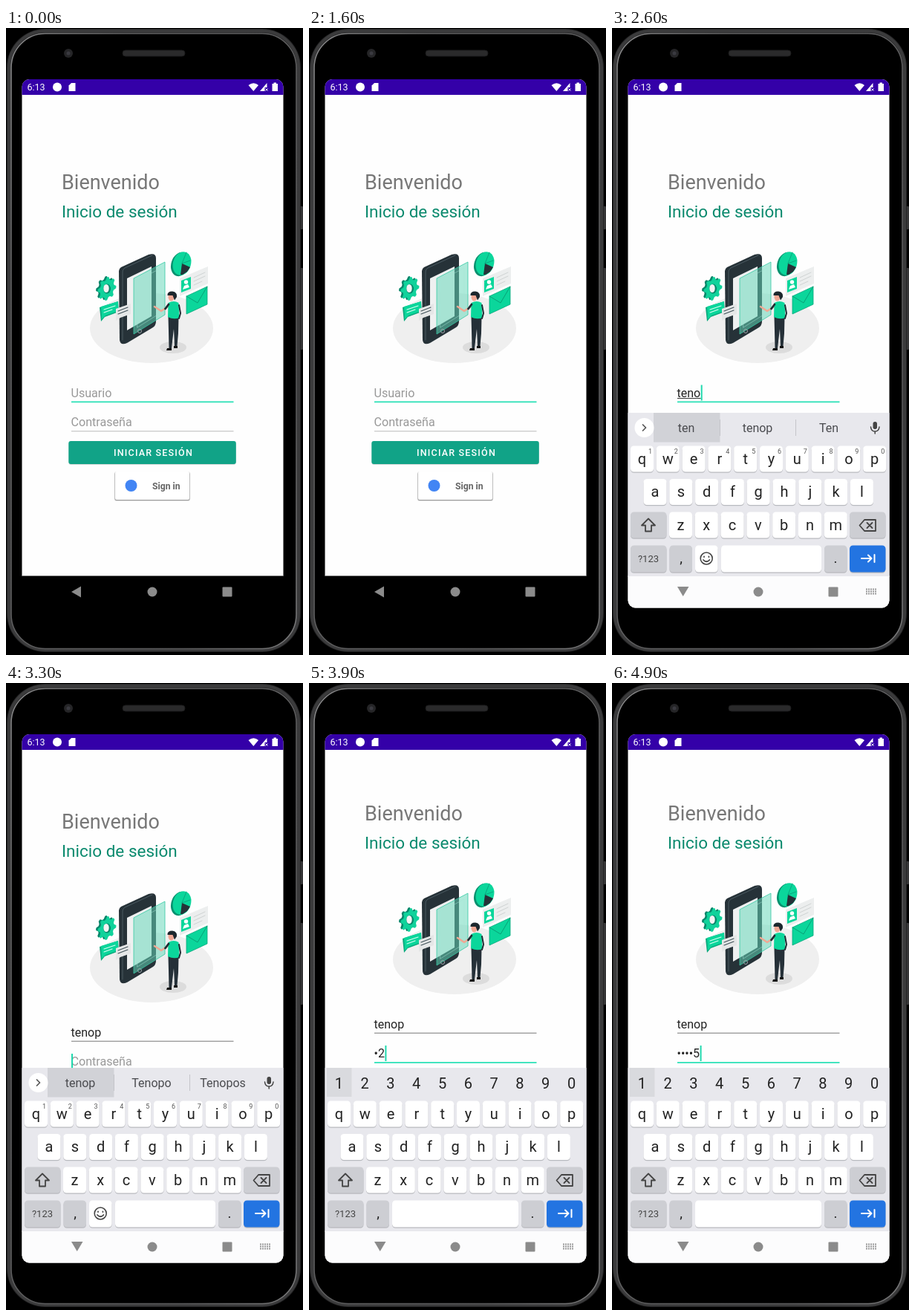
An HTML page that plays this animation: 400x844 px, repeating every 5000 ms.

```html
<!DOCTYPE html>
<html lang="es">
<head>
<meta charset="utf-8">
<title>Inicio de sesión</title>
<style>
html, body { margin: 0; width: 100%; height: 100%; overflow: hidden; background: #000; }
svg { display: block; width: 100%; height: 100%; }
text { font-family: Roboto, Arial, sans-serif; white-space: pre; }
.mid { text-anchor: middle; }
.line { fill: none; stroke-linecap: round; stroke-linejoin: round; }
</style>
</head>
<body>
<svg viewBox="0 0 400 844">
  <defs>
    <linearGradient id="shine" x1="0" x2="1" y1="0" y2="1">
      <stop offset="0" stop-color="#8a8a8b"/><stop offset=".2" stop-color="#626263"/>
      <stop offset=".8" stop-color="#5a5a5b"/><stop offset="1" stop-color="#7a7a7b"/>
    </linearGradient>
    <clipPath id="screen"><rect x="21.500" y="69" width="352" height="711.500" rx="10"/></clipPath>
    <clipPath id="view"><rect x="21" y="90" width="353" height="691"/></clipPath>
  </defs>

  <rect width="400" height="844"/>
  <g fill="#363637">
    <rect x="396" y="240" width="4" height="31" rx="1"/>
    <rect x="396" y="323" width="4" height="110" rx="1"/>
  </g>
  <rect x="1" y="1" width="396" height="839" rx="52" fill="#252526"/>
  <rect x="4" y="4" width="390" height="833" rx="49" fill="none" stroke="#3b3b3c" stroke-width="4"/>
  <rect x="7" y="7.500" width="384" height="828" rx="46" stroke="url(#shine)" stroke-width="1.600"/>
  <circle cx="84" cy="34" r="6" fill="#252527"/><circle cx="84" cy="34" r="2.500" fill="#3a3a40"/>
  <rect x="157" y="30" width="84" height="8" rx="4" fill="#2a2a2b" stroke="#1d1d1e"/>

  <g clip-path="url(#screen)">
    <rect x="21" y="69" width="353" height="669" fill="#fefefe"/>
    <rect id="navBg" x="21" y="737" width="353" height="44" fill="#fefefe"/>
    <g clip-path="url(#view)"><g id="page">
      <text x="75" y="217" font-size="27" fill="#777">Bienvenido</text>
      <text x="75" y="255" font-size="22.500" fill="#0b8a6e">Inicio de sesión</text>
      <g id="art"></g>
      <text id="userHint" x="87.500" y="497" font-size="16.100" fill="#999">Usuario</text>
      <text id="user" x="87.500" y="497" font-size="16" fill="#222"></text>
      <rect id="compose" x="88" y="498" height="1" fill="#333"/>
      <rect id="userLine" x="88" width="218.500"/>
      <text id="passHint" x="87.500" y="536" font-size="16.100" fill="#999">Contraseña</text>
      <text id="pass" x="87.500" y="536" font-size="16" fill="#222"></text>
      <rect id="passLine" x="88" width="218.500"/>
      <rect id="caret" width="2" height="21" fill="#20d9ae"/>
      <rect x="84.500" y="557" width="225" height="31" rx="3" fill="#000" opacity=".15"/>
      <rect x="84.300" y="556" width="225.500" height="31" rx="3" fill="#11a387"/>
      <text class="mid" x="198.500" y="576.300" font-size="12.500" font-weight="500" letter-spacing="1.200" fill="#fff">INICIAR SESIÓN</text>
      <rect x="146" y="597" width="102" height="40" rx="3" fill="#000" opacity=".12"/>
      <rect x="146.500" y="598" width="101" height="38" rx="2" fill="#000" opacity=".3"/>
      <rect x="147" y="597" width="100" height="38" rx="2" fill="#fff"/>
      <circle cx="168.500" cy="616" r="8" fill="#4285f4"/>
      <text x="197" y="620.500" font-size="12.200" font-weight="700" fill="#666">Sign in</text>
    </g></g>

    <rect x="21" y="69" width="353" height="21" fill="#3400a8"/>
    <text x="28.500" y="84" font-size="12.500" fill="#fff">6:13</text>
    <g fill="#fff">
      <circle cx="69" cy="79.500" r="6"/>
      <path d="M88 74h5.500v11h-9v-7.500z"/>
      <path d="M326.500 77q7-5.500 13.500 0l-6.700 8z"/>
      <path d="M351.500 74v6h-3v5h-6.500z"/>
      <path d="M349.500 81.500l3 3m0-3l-3 3" stroke="#fff"/>
      <path d="M358.500 75h2v-1.500h3.500v1.500h2v10h-7.500z"/>
    </g>

    <g id="kb"></g>
    <rect id="shade" x="21" y="737.500" width="353" height="44"/>
    <g fill="#8b8b8b">
      <path id="back"/>
      <circle cx="197" cy="759" r="6.500"/>
      <rect x="291.500" y="752.500" width="13" height="13" rx="1"/>
      <path id="kbIcon" d="M342 755.500h14m-14 3h14m-14 3h14" stroke="#999" stroke-width="2" stroke-dasharray="2 1"/>
    </g>
  </g>
</svg>

<script>
const $ = id => document.getElementById(id);
const set = (el, attrs) => { for (const k in attrs) el.setAttribute(k, attrs[k]); };
const show = (el, on) => el.style.display = on ? '' : 'none';
const poly = (pts, fill, extra = '') => `<polygon points="${pts}" fill="${fill}" ${extra}/>`;
const path = (d, stroke, w = 1) => `<path class="line" d="${d}" stroke="${stroke}" stroke-width="${w}"/>`;
const label = (x, y, s, size, fill = '#222') =>
  `<text class="mid" x="${x}" y="${y}" font-size="${size}" fill="${fill}">${s}</text>`;

const MINT = '#0bd69b', DEEP = '#07a77b', INK = '#263238';

function gear(cx, cy) {
  const pts = [];
  for (let i = 0; i < 32; i++) {
    const a = i / 32 * Math.PI * 2, r = i % 4 < 2 ? 15.5 : 12;
    pts.push(`${(cx + r * .8 * Math.cos(a)).toFixed(1)},${(cy + r * Math.sin(a) - r * .25 * Math.cos(a)).toFixed(1)}`);
  }
  const p = pts.join(' ');
  return poly(p, '#08866a', 'transform="translate(-2.5 -1)"') + poly(p, '#10d29b') +
    `<ellipse cx="${cx}" cy="${cy}" rx="5" ry="6.500" fill="#08866a"/>` +
    `<ellipse cx="${cx - 1}" cy="${cy - .5}" rx="3.700" ry="5.500" fill="#f4f4f4"/>`;
}

$('art').innerHTML =
  '<ellipse cx="196" cy="404" rx="83" ry="47" fill="#efefef"/>' +
  '<ellipse cx="225" cy="430" rx="18" ry="8" fill="#dcdcdc"/>' +
  gear(136, 351) +
  // phone
  `<path d="M152 327Q152 324 155 322L192 305Q202 302 202 310V395Q202 400 198 403L163 424Q154 428 153 420Z" fill="${INK}"/>` +
  path('M157 420V328Q157 325 160 323L197 306', '#54646b', .8) +
  poly('163,337 196,321 196,388 163,407', '#eef0f0') +
  poly('172,337 214,315 214,386 172,412', '#67d9bb', 'fill-opacity=".52" stroke="#35c9a4" stroke-width=".8"') +
  path('M177 340L209 323V383L177 403Z', '#a5e5d4', .5) +
  '<circle cx="180" cy="408" r="2.500" fill="none" stroke="#9aa5a8"/>' +
  // chat bubbles
  poly('126,376 151,368 152,382 133,389 128,395', DEEP) +
  poly('128,375 151,368 151,381 134,387 129,392', MINT) +
  path('M132 379L147 374M132 383L143 379', '#d8fff2', 1.2) +
  poly('148,378 168,371 168,385 154,390 148,394', '#e5e7e7') +
  path('M151 381L164 376M151 385L164 380', '#42535a', 1.2) +
  // pie chart
  '<ellipse cx="234.500" cy="318" rx="12" ry="16.500" transform="rotate(18 234.500 318)" fill="#08916f"/>' +
  `<ellipse cx="237" cy="317" rx="12" ry="16" transform="rotate(18 237 317)" fill="${MINT}"/>` +
  poly('237,317 248,322 244,328 238,332 235,332', INK) +
  path('M237 317L243 302M237 317L248 313', '#0a9c78', .8) +
  // contact card
  poly('234,337 272,321 272,344 234,361', '#eceeee') +
  poly('236,340 249,335 249,351 236,356', MINT) +
  '<circle cx="242.500" cy="342" r="2.700" fill="#fff"/>' +
  poly('238,352 240,347 245,345 247,349', '#fff') +
  path('M253 336L268 329M253 341L268 334M253 346L264 341', '#cfd3d3') +
  // envelope
  poly('243,361 271,348 271,372 243,385', MINT, `stroke="${DEEP}" stroke-width=".8"`) +
  path('M243 361L258 370L271 348', '#07936e', .8) +
  // man
  poly('218.500,389 232.500,389 232,411 230.500,428 227,428 226,405 223,431 219.500,431 219,408', '#253038') +
  '<path d="M217 431h6v3h-7zM226 428h5v3h-5z" fill="#111"/>' +
  path('M218 375L209 381L200 375', '#f0a894', 2.500) +
  `<path d="M218.500 370Q226 366 232.500 370L233.500 390Q226 393 218 389Z" fill="${MINT}"/>` +
  path('M219 372L214.500 378', '#1f2d34', 2.800) + path('M233 373L235 384L233 391', '#1f2d34', 2) +
  '<ellipse cx="222.500" cy="362" rx="4" ry="5.500" fill="#f0a894"/>' +
  '<path d="M217.500 360Q217 354.500 224 354.500Q231 355.500 230 362L227 366.500L224.500 360Z" fill="#1d282e"/>';

const STEP = 34.8;
const key = (x, y, w, fill = '#fff', h = 35) =>
  `<rect x="${x}" y="${y + 1.3}" width="${w}" height="${h}" rx="4.500" fill="#b9babf"/>` +
  `<rect x="${x}" y="${y}" width="${w}" height="${h}" rx="4.500" fill="${fill}"/>`;
const row = (letters, x0, y) => [...letters].map((c, i) => {
  const x = x0 + i * STEP;
  return key(x - 15.5, y, 31) + label(x, y + 24, c, 20);
}).join('');
const digits = [...'1234567890'];
const GREY = '#cdced3';
const mic = color => `<rect x="351.500" y="530" width="5.500" height="10" rx="2.700" fill="${color}"/>` +
  path('M348.500 537Q349 543 354.200 543T360 537M354.200 543V546', color, 1.5);
const arrow = d => '<circle cx="43.500" cy="538" r="13" fill="#fff"/>' + path(d, '#555', 1.7);

$('kb').innerHTML =
  '<rect x="21" y="518" width="353" height="221" fill="#e8e8ed"/>' +
  '<rect x="21" y="738" width="353" height="43" fill="#fcfcfd"/>' +
  '<g id="tools">' + arrow('M45.500 534L41.500 538L45.500 542') +
    '<g class="line" stroke="#8b8c90" stroke-width="1.700">' +
    '<circle cx="88.500" cy="537" r="5"/><path d="M92.500 541L97 545.500"/>' +
    '<path d="M134 532h13v8l-5 5h-8zM142 545v-5h5M137.500 536v1m5-1v1m-5 3q2 2 4 0"/>' +
    '<path d="M235 532h12v13h-12zM238.500 530.500h5v3h-5zM238 537h6m-6 3h6m-6 3h4"/></g>' +
    '<text class="mid" x="190" y="543" font-size="12.500" font-weight="700" fill="#85868a">GIF</text>' +
    '<path d="M298.500 538h0m5.500 0h0m5.500 0h0" class="line" stroke="#85868a" stroke-width="3.500"/>' + mic('#85868a') + '</g>' +
  '<g id="words"><rect x="56" y="518" width="89.500" height="39.500" fill="#d1d2d7"/>' +
    arrow('M41.500 534L45.500 538L41.500 542') +
    '<path d="M145.500 527v22M247.500 527v22" stroke="#c4c5ca"/>' +
    [100, 196, 292].map(x => label(x, 544, '', 16, '#4a4b4f')).join('') + mic('#444') + '</g>' +
  '<g id="nums"><rect x="24" y="518" width="33.500" height="39" fill="#d9dade"/>' +
    digits.map((d, i) => label(40.3 + i * STEP, 546, d, 20)).join('') + '</g>' +
  row('qwertyuiop', 40.5, 562.5) + row('asdfghjkl', 58, 607) + row('zxcvbnm', 92.5, 651.5) +
  '<g id="hints">' + digits.map((d, i) => label(51.5 + i * STEP, 572.5, d, 9, '#555')).join('') + '</g>' +
  key(25, 651.5, 48.5, GREY) + path('M49 660.500L40 669.500H45V677.500H53V669.500H58Z', '#444', 1.8) +
  key(320, 651.5, 48.5, GREY) + path('M340 662H355V677H340L333.500 669.500ZM343.500 666L350.500 673M350.500 666L343.500 673', '#444', 1.8) +
  key(25, 696.5, 48.5, GREY, 36) + label(49, 719, '?123', 13, '#444') +
  key(77.5, 696.5, 30.5, GREY, 36) + label(93, 720, ',', 19) +
  '<g id="smile">' + key(112, 696.5, 30.5, '#fff', 36) + key(147, 696.5, 135, '#fff', 36) +
    '<circle cx="127.200" cy="714" r="8" class="line" stroke="#444" stroke-width="1.600"/>' +
    path('M124 711.500v.5M130.400 711.500v.5M123 716Q127.200 720.500 131.400 716', '#444', 1.8) + '</g>' +
  '<g id="space">' + key(112, 696.5, 170, '#fff', 36) + '</g>' +
  key(286, 696.5, 30.5, GREY, 36) + label(301, 720, '.', 19) +
  key(320, 696.5, 48.5, '#2374e1', 36) +
  path('M336 714H349M345 709.500L349.500 714L345 718.500M353.500 709V719', '#fff', 2);

const NAME = 'tenop';
const LOOP = 5000, FOCUS = 3300, NUMERIC = 3500;
const passTimes = [3800, 3900, 4100, 4300, 4500];
const clamp = v => Math.max(0, Math.min(1, v));

function fieldLine(el, y, focused, color) {
  set(el, { y: focused ? y - .5 : y - .3, height: focused ? 1.7 : 1, fill: focused ? '#24e0b5' : color });
}

function render(ms) {
  const t = Math.floor(ms % LOOP / 100) * 100;
  const rise = clamp((t - 2200) / 400);
  const inPass = t >= FOCUS, numeric = t >= NUMERIC;
  const scroll = inPass ? (t < FOCUS + 100 ? 21 : 32) : 0;
  set($('page'), { transform: `translate(0 ${-scroll})` });

  const typed = NAME.slice(0, Math.max(0, (t - 2200) / 100));
  const count = passTimes.filter(p => t >= p).length;
  const secret = count ? '•'.repeat(count - 1) + count : '';
  $('user').textContent = typed;
  $('pass').textContent = secret;
  show($('userHint'), !typed);
  show($('passHint'), !secret);
  fieldLine($('userLine'), 503, !inPass, '#777');
  fieldLine($('passLine'), 542.6, inPass, '#bbb');

  const width = id => $(id).textContent ? $(id).getComputedTextLength() : 0;
  const userWidth = width('user');
  set($('compose'), { width: userWidth });
  show($('compose'), t >= 2500 && !inPass);
  const blink = t % 1000;
  show($('caret'), t >= 2100 || blink >= 100 && blink < 600);
  set($('caret'), { x: 88 + (inPass ? width('pass') : userWidth), y: inPass ? 520 : 480.5 });

  show($('kb'), rise > 0);
  show($('navBg'), rise > 0);
  set($('kb'), { transform: `translate(0 ${220 * (1 - rise)})`, opacity: clamp(rise * 1.3) });
  set($('shade'), { opacity: (1 - rise) ** .8 });
  set($('back'), { d: rise < 1 ? 'M88 759L101 751.500V766.500Z' : 'M88 752H103.500L95.700 765Z' });
  set($('kbIcon'), { opacity: rise });

  show($('tools'), t < 2500);
  show($('words'), t >= 2500 && !numeric);
  show($('nums'), numeric);
  show($('hints'), !numeric);
  show($('smile'), !numeric);
  show($('space'), numeric);
  const words = t < 2700 ? ['ten', NAME, 'Ten'] : [NAME, 'Tenopo', 'Tenopos'];
  $('words').querySelectorAll('text').forEach((el, i) => el.textContent = words[i]);
}

const start = performance.now();
function tick() {
  render(performance.now() - start);
  requestAnimationFrame(tick);
}
tick();
</script>
</body>
</html>
```
